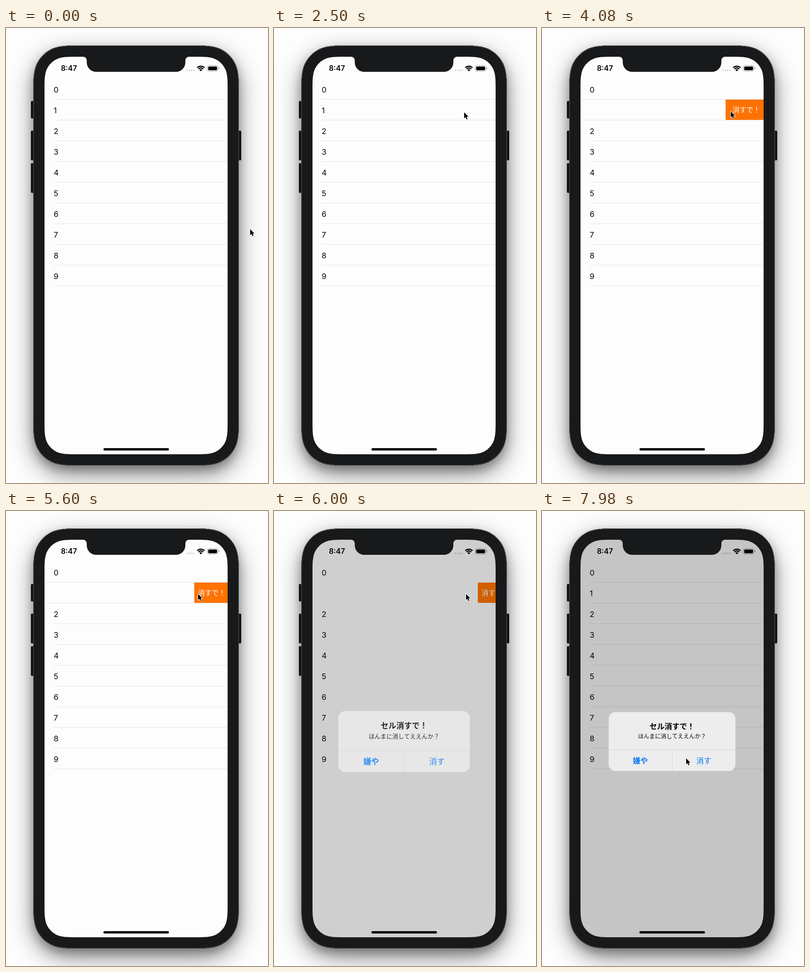
An HTML page with a canvas that plays this animation: 558 px wide and 966 px high, repeating every 8 s.

```html
<!DOCTYPE html>
<html lang="ja">
<head>
<meta charset="utf-8">
<title>Swipe to delete</title>
<style>
html, body { margin: 0; width: 100%; height: 100%; overflow: hidden; background: #fdfdfd; }
canvas { display: block; }
</style>
</head>
<body>
<canvas id="stage" width="558" height="966"></canvas>
<script>
const W = 558, H = 966, LOOP = 8000;
const ctx = document.getElementById('stage').getContext('2d');
const LATIN = 'Inter, Roboto, sans-serif';
const JP = '"Noto Sans CJK JP", "Noto Sans CJK", sans-serif';
const PAPER = '#fdfdfd', INK = '#060606', BODY = '#18191a';
const LEFT = 82, RIGHT = 472, TOP = 61, BOTTOM = 905;
const ROW = 44, OPEN = 71, TAPPED = 5780;

const clamp = v => Math.max(0, Math.min(1, v));
const ease = v => v * v * (3 - 2 * v);

// Interpolates between rows of [time, ...values].
function along(keys, t) {
  let i = 0;
  while (i < keys.length - 2 && t >= keys[i + 1][0]) i++;
  const [a, b] = [keys[i], keys[i + 1]];
  const k = ease(clamp((t - a[0]) / (b[0] - a[0])));
  return a.slice(1).map((v, n) => v + (b[n + 1] - v) * k);
}

function box(c, x, y, w, h, r, fill) {
  c.beginPath();
  c.roundRect(x, y, w, h, r);
  c.fillStyle = fill;
  c.fill();
}

function label(text, x, y, font, color, align = 'left') {
  ctx.font = font;
  ctx.fillStyle = color;
  ctx.textAlign = align;
  ctx.fillText(text, x, y);
}

// Continuous corner at (x, y): arrives along (ux, uy), leaves along (vx, vy).
function corner(p, x, y, [ux, uy], [vx, vy], r) {
  const at = (a, b) => [x + r * (b * vx - a * ux), y + r * (b * vy - a * uy)];
  p.lineTo(...at(1.5287, 0));
  p.bezierCurveTo(...at(1.0885, 0), ...at(0.8684, 0), ...at(0.6315, 0.0749));
  p.bezierCurveTo(...at(0.3728, 0.1691), ...at(0.1691, 0.3728), ...at(0.0749, 0.6315));
  p.bezierCurveTo(...at(0, 0.8684), ...at(0, 1.0885), ...at(0, 1.5287));
}

function smoothBox(x, y, w, h, r, topEdge) {
  const p = new Path2D();
  const right = [1, 0], down = [0, 1], left = [-1, 0], up = [0, -1];
  p.moveTo(x + w / 2, y + h);
  corner(p, x, y + h, left, up, r);
  corner(p, x, y, up, right, r);
  if (topEdge) topEdge(p);
  corner(p, x + w, y, right, down, r);
  corner(p, x + w, y + h, down, left, r);
  p.closePath();
  return p;
}

function notch(p) {
  const r = 20, f = 8;
  p.lineTo(172 - f, TOP);
  p.arcTo(172, TOP, 172, TOP + f, f);
  p.arcTo(172, 93, 172 + r, 93, r);
  p.arcTo(382, 93, 382, 93 - r, r);
  p.arcTo(382, TOP, 382 + f, TOP, f);
}

function makePhone() {
  const layer = document.createElement('canvas');
  layer.width = W;
  layer.height = H;
  const c = layer.getContext('2d');
  const shell = smoothBox(58, 37, 438, 892, 71);
  c.fillStyle = PAPER;
  c.fillRect(0, 0, W, H);
  c.fillStyle = BODY;
  for (const [alpha, blur, dy] of [[0.45, 50, 18], [0.25, 20, 10]]) {
    c.save();
    c.shadowColor = `rgba(0, 0, 0, ${alpha})`;
    c.shadowBlur = blur;
    c.shadowOffsetY = dy;
    c.fill(shell);
    c.restore();
  }
  for (const [x, y, h] of [[53, 155, 37], [53, 218, 63], [53, 287, 63], [494, 218, 63]]) {
    box(c, x, y, 7, h, 2, '#121212');
  }
  c.fillStyle = BODY;
  c.fill(shell);
  c.strokeStyle = '#57585a';
  c.lineWidth = 1;
  c.stroke(smoothBox(58.5, 37.5, 437, 891, 70.5));
  return layer;
}

const phone = makePhone();
const screen = smoothBox(LEFT, TOP, RIGHT - LEFT, BOTTOM - TOP, 47.3, notch);
const arrow = new Path2D('M0 0V13L2.9 10.2L5 14.9L7.1 14L5.1 9.4H9.2Z');

const pointerKeys = [
  [350, 520, 427], [1900, 405, 179], [2600, 405, 179], [3250, 460, 178],
  [3380, 460, 178], [3960, 402, 177], [4300, 402, 177], [5200, 409, 176],
  [6650, 409, 176], [7650, 307, 525]
];
const swipeKeys = [[3380, 0], [4030, 81], [4120, 81], [4450, OPEN]];

function slide(t) {
  if (t < TAPPED) return along(swipeKeys, t)[0];
  const d = OPEN * Math.exp(-(t - TAPPED) / 352);
  return d < 0.7 ? 0 : d;
}

function drawList(off, showLines) {
  for (let i = 0; i < 10; i++) {
    const y = 108 + ROW * i;
    const moved = i === 1 ? off : 0;
    label(String(i), 101.5 - moved, y + 28.5, '400 16.5px ' + LATIN, INK);
    if (showLines) {
      const x = 102 - (i < 2 ? Math.min(off, 20) : 0);
      ctx.fillStyle = '#e3e3e4';
      ctx.fillRect(x, y + 43, RIGHT - x, 1);
    }
  }
  if (off > 0) {
    const x = RIGHT - off;
    ctx.fillStyle = '#ff7200';
    ctx.fillRect(x, 152, off + 1, 43);
    label('消すで！', x + 8 + Math.max(0, off - OPEN) * 0.7, 179, '500 14.6px ' + JP, '#fff');
  }
}

function drawStatus() {
  label('8:47', 134, 91.3, '600 15.5px ' + LATIN, '#000', 'center');
  for (let i = 0; i < 4; i++) box(ctx, 384.5 + i * 4.7, 88.3, 3, 3, 1.5, '#c8c8c8');

  ctx.save();
  ctx.beginPath();
  ctx.moveTo(415, 92);
  ctx.arc(415, 92, 12.5, -Math.PI * 0.75, -Math.PI * 0.25);
  ctx.closePath();
  ctx.clip();
  ctx.strokeStyle = '#000';
  ctx.lineWidth = 2.4;
  for (const r of [11, 7.2]) {
    ctx.beginPath();
    ctx.arc(415, 92, r, Math.PI, 0);
    ctx.stroke();
  }
  ctx.beginPath();
  ctx.arc(415, 92, 4.4, Math.PI, 0);
  ctx.fillStyle = '#000';
  ctx.fill();
  ctx.restore();

  ctx.strokeStyle = '#a2a2a2';
  ctx.lineWidth = 1;
  ctx.beginPath();
  ctx.roundRect(428.5, 79.8, 23, 11.8, 3.5);
  ctx.stroke();
  box(ctx, 430.5, 81.7, 19, 8, 2, '#000');
  box(ctx, 452.7, 83.7, 1.5, 4, 1, '#a2a2a2');
}

function drawAlert(t, alpha) {
  const scale = 1 + 0.2 * Math.exp(-(t - TAPPED - 20) / 118);
  ctx.save();
  ctx.globalAlpha = alpha;
  ctx.translate(277, 489.5);
  ctx.scale(scale, scale);
  ctx.translate(-277, -489.5);
  box(ctx, 142, 427, 270, 125, 14, '#ededee');
  ctx.fillStyle = '#d6d6d8';
  ctx.fillRect(142, 507, 270, 1);
  ctx.fillRect(277, 507, 1, 45);
  label('セル消すで！', 277, 463, '700 16px ' + JP, '#000', 'center');
  label('ほんまに消してええんか？', 277, 483, '400 12.1px ' + JP, INK, 'center');
  label('嫌や', 209.5, 536, '700 16px ' + JP, '#087af4', 'center');
  label('消す', 344.5, 536, '400 16px ' + JP, '#087af4', 'center');
  ctx.restore();
}

function drawPointer(x, y) {
  ctx.save();
  ctx.translate(x, y);
  ctx.lineJoin = 'round';
  ctx.strokeStyle = '#fff';
  ctx.lineWidth = 2;
  ctx.stroke(arrow);
  ctx.fillStyle = '#000';
  ctx.fill(arrow);
  ctx.restore();
}

function draw(t) {
  const off = slide(t);
  const shown = clamp((t - TAPPED - 20) / 245);
  ctx.drawImage(phone, 0, 0);
  ctx.save();
  ctx.clip(screen);
  ctx.fillStyle = PAPER;
  ctx.fillRect(LEFT, TOP, RIGHT - LEFT, BOTTOM - TOP);
  drawList(off, shown < 0.4 || shown === 1);
  drawStatus();
  if (shown > 0) {
    ctx.save();
    ctx.globalCompositeOperation = 'multiply';
    ctx.globalAlpha = shown;
    ctx.fillStyle = '#c7c7c8';
    ctx.fillRect(LEFT, TOP, RIGHT - LEFT, BOTTOM - TOP);
    ctx.restore();
    drawAlert(t, shown);
  }
  box(ctx, 207.5, 892, 139.5, 5, 2.5, '#000');
  ctx.restore();
  drawPointer(...along(pointerKeys, t));
}

const start = performance.now();
function tick() {
  draw((performance.now() - start) % LOOP);
  requestAnimationFrame(tick);
}
tick();
</script>
</body>
</html>
```
